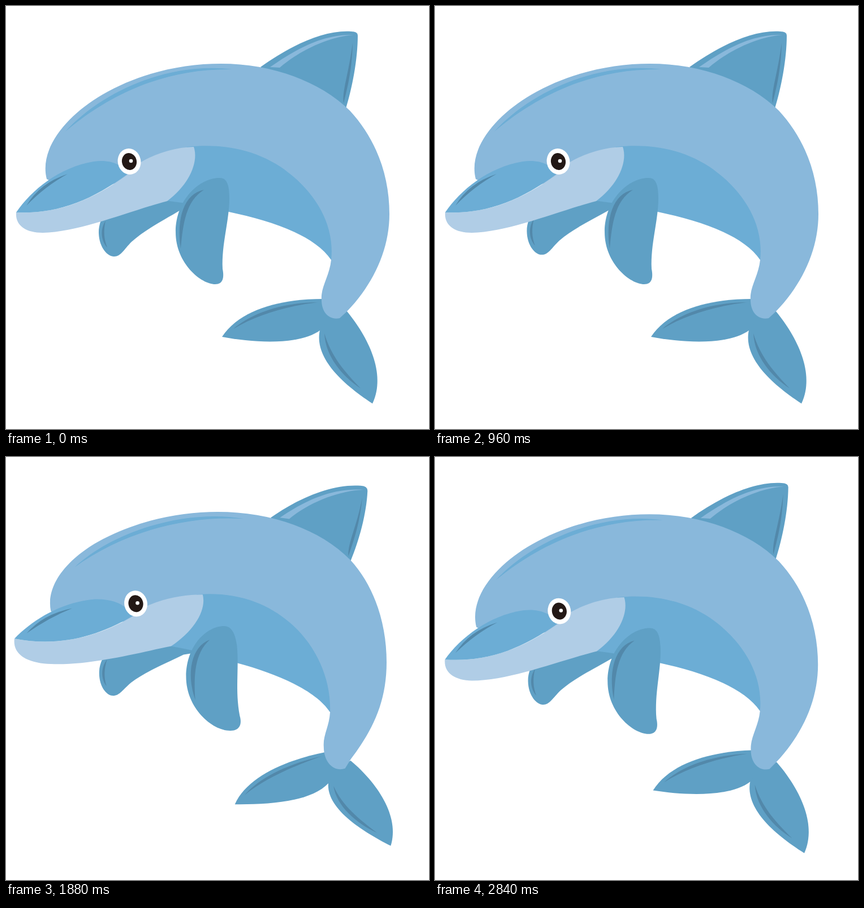
An HTML page for the animation above (2880 ms loop, 748 px wide and 748 px high).

```html
<!DOCTYPE html>
<html lang="en">
<head>
<meta charset="utf-8">
<title>Dolphin</title>
<style>
  html, body { margin: 0; width: 100%; height: 100%; overflow: hidden; background: #fff; }
  svg { display: block; width: 100vw; height: 100vh; }
</style>
</head>
<body>
<svg id="stage" viewBox="0 0 748 748"></svg>
<script>
const LOOP = 2880, STEP = 40;
const FIN = '#5fa0c5', SHADE = '#5288aa', BODY = '#89b8db', BELLY = '#6cadd5', JAW = '#b0cde6';
const stage = document.getElementById('stage');

// Piecewise linear tracks: [time, value]
const bodyTrack = [[0, 0], [480, 1], [960, 0], [1560, 1], [2040, 0], [2280, .5], [LOOP, .02]];
const flipperTrack = [[0, 0], [480, 1], [960, 0], [1560, 1], [2040, 0], [2280, 1], [LOOP, .03]];
const rearTrack = [[0, 0], [360, -23], [960, 1.5], [1400, -21], [1900, 6], [2280, -21], [2840, 1], [LOOP, 0]];

function sample(track, t) {
  const i = track.findIndex(key => key[0] > t);
  const [t0, a] = track[i - 1], [t1, b] = track[i];
  return a + (b - a) * (t - t0) / (t1 - t0);
}

function add(tag, attrs, parent = stage) {
  const node = document.createElementNS('http://www.w3.org/2000/svg', tag);
  for (const name in attrs) node.setAttribute(name, attrs[name]);
  return parent.appendChild(node);
}

// A part whose outline blends between the lowered and the raised pose
const parts = [];
function morph(fill, low, high, track = bodyTrack) {
  const target = high.match(/[\d.]+/g).map(Number);
  const node = add('path', { fill });
  parts.push({ track, draw(k) {
    let i = 0;
    node.setAttribute('d', low.replace(/[\d.]+/g, n => (+n + (target[i++] - n) * k).toFixed(2)));
  } });
}

// Dorsal fin
morph(FIN,
  'M450 108C500 72 560 42 610 45Q622 45 622 52C622 95 612 145 601 181L560 170L470 125Z',
  'M497 106C545 73 605 55 655 60Q668 62 667 73C662 110 645 150 622 191L580 175L510 125Z');
morph(BODY,
  'M467 108C515 75 560 50 614 51C570 55 520 78 484 109Z',
  'M512 106C555 78 605 62 660 69C615 67 560 85 528 110Z');
morph(SHADE,
  'M613 65C612 110 605 140 597 172C594 150 606 120 613 65Z',
  'M657 82C650 115 635 150 619 180C620 155 645 125 657 82Z');

// Tail flukes
morph(FIN,
  'M382 585C415 535 490 518 560 518L580 550L556 573C520 600 440 596 382 585Z',
  'M441 661C445 610 520 560 575 528L600 550L594 582C570 625 510 645 441 661Z');
morph(SHADE,
  'M402 571C440 538 500 524 551 524C500 530 445 545 402 571Z',
  'M453 641C475 600 520 568 570 537C525 572 480 605 453 641Z');
morph(FIN,
  'M603 540C640 585 673 650 648 703C590 665 545 620 555 573L580 545Z',
  'M620 532C680 560 735 610 732 663C680 650 600 620 594 582L600 550Z');
morph(SHADE,
  'M563 579C565 620 595 655 627 676C600 648 575 620 563 579Z',
  'M605 586C615 612 660 638 703 646C665 630 625 610 605 586Z');

// Rear flipper
const rear = add('g', {});
add('path', { fill: FIN, d: 'M300 310L225 321C185 340 163 375 164 402C165 428 180 443 191 443C203 443 208 431 222 417C245 396 275 381 310 360L330 355Z' }, rear);
add('path', { fill: SHADE, d: 'M176 380C166 395 168 415 179 427C173 412 172 397 176 380Z' }, rear);

// Body, belly, head
morph(BODY,
  'M72 306C58 250 110 192 170 157C235 119 310 102 380 102C470 102 555 133 608 185C655 236 678 300 678 368C678 430 650 492 602 541L590 552C572 556 558 542 558 520C556 497 572 478 575 449C576 400 540 340 485 300L300 290L120 330Z',
  'M91 219C86 172 137 132 201 113C257 96 312 89 365 89C455 89 550 113 611 178C645 215 665 285 665 355C665 440 645 470 623 522L615 549C595 560 568 540 568 500C567 485 571 475 570 455C562 395 540 335 500 300L330 270L110 250Z');
morph(BELLY,
  'M575 449C582 385 545 325 485 284C440 255 385 242 320 249L270 343Q340 350 394 364C470 380 545 405 575 449Z',
  'M570 455C565 390 540 320 505 288C468 250 420 232 365 234L290 316Q340 328 437 366C480 385 550 420 570 455Z');
morph(JAW,
  'M18 365C90 368 150 345 215 298L237 277C265 260 300 250 332 249C341 275 325 315 285 345C220 362 130 400 65 401C35 401 16 388 18 365Z',
  'M10 251C85 283 170 282 240 255L269 242C300 234 340 232 373 234C377 260 350 292 303 318C250 322 150 327 70 308C25 297 5 278 10 251Z');
morph(BELLY,
  'M18 365C45 325 95 285 155 275C185 271 205 280 215 297C150 345 90 368 18 365Z',
  'M10 251C50 228 105 210 160 214C195 217 225 232 240 254C170 282 85 283 10 251Z');
morph(SHADE,
  'M36 353Q60 313 109 297Q70 318 36 353Z',
  'M37 246Q75 221 130 220Q85 229 37 246Z');
morph(BELLY,
  'M105 222C170 150 290 98 400 112C290 110 190 150 105 222Z',
  'M147 152C215 105 355 80 455 105C355 91 225 111 147 152Z');

// Eye
const eye = add('g', {});
add('ellipse', { rx: 20.3, ry: 23, fill: '#fff', transform: 'rotate(-12)' }, eye);
add('ellipse', { rx: 13, ry: 15, fill: '#231815', transform: 'rotate(-12)' }, eye);
add('circle', { cx: 3, cy: -1, r: 3.3, fill: '#fff' }, eye);

// Front flipper
morph(FIN,
  'M378 304C345 303 300 340 300 400C300 455 345 492 370 492C384 492 386 480 383 465C381 420 395 380 395 340C395 315 390 304 378 304Z',
  'M398 291C375 291 348 320 348 370C348 425 395 472 440 471C462 471 468 458 462 446C443 400 440 370 430 325C422 302 410 291 398 291Z',
  flipperTrack);
morph(SHADE,
  'M350 325C315 332 301 375 309 429C313 385 318 345 350 325Z',
  'M377 320C350 340 345 390 376 431C362 390 358 350 377 320Z',
  flipperTrack);

// The raised outlines describe this share of the full swing
const RAISED = .867;

function draw(now) {
  const t = Math.floor(now % LOOP / STEP) * STEP;
  for (const part of parts) part.draw(sample(part.track, t) / RAISED);
  const k = sample(bodyTrack, t) / RAISED;
  eye.setAttribute('transform', `translate(${218 + 30 * k} ${275 - 41 * k})`);
  const lift = sample(flipperTrack, t);
  rear.setAttribute('transform', `translate(${17 * lift} ${-31 * lift}) rotate(${sample(rearTrack, t)} 310 340)`);
}

const start = performance.now();
function tick() {
  draw(performance.now() - start);
  requestAnimationFrame(tick);
}
tick();
</script>
</body>
</html>
```
